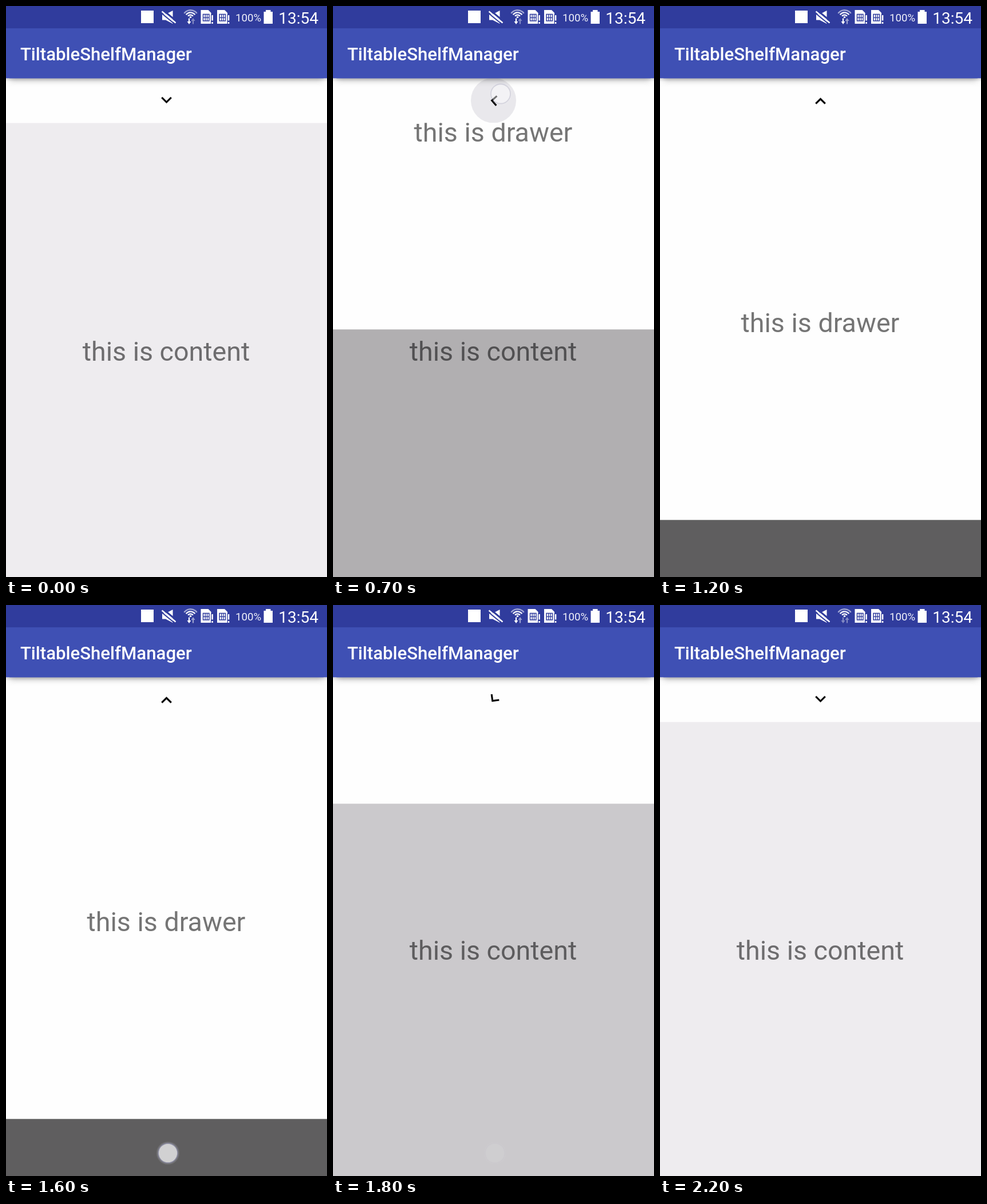
An HTML page with a canvas that plays this animation: 561x998 px, repeating every 2300 ms.

```html
<!DOCTYPE html>
<html lang="en">
<head>
<meta charset="utf-8">
<title>Drawer</title>
<style>
  html, body { margin: 0; width: 100%; height: 100%; overflow: hidden; }
  canvas { display: block; }
</style>
</head>
<body>
<canvas id="stage" width="561" height="998"></canvas>
<script>
const W = 561, H = 998, MID = 280.5;
const LOOP = 2300, STEP = 100;
const BAR = 39, TOP = 126.3, CLOSED = 204.3, TRAVEL = 693.9;
const DP = 1.558;
const STATUS_BLUE = '#303c9d';
const ctx = document.getElementById('stage').getContext('2d');

const clamp = v => Math.min(1, Math.max(0, v));
const settle = u => 1 - Math.pow(1 - clamp(u), 5);

// How far the drawer is open, 0 to 1
function openness(t) {
  return t < 1600 ? settle((t - 623.5) / 559) : 1 - settle((t - 1637) / 602);
}

function box(x, y, w, h, color) {
  ctx.fillStyle = color;
  ctx.fillRect(x, y, w, h);
}

function disc(x, y, r, color) {
  ctx.fillStyle = color;
  ctx.beginPath();
  ctx.arc(x, y, r, 0, Math.PI * 2);
  ctx.fill();
}

function poly(points, color) {
  ctx.fillStyle = color;
  ctx.beginPath();
  points.forEach(([x, y]) => ctx.lineTo(x, y));
  ctx.closePath();
  ctx.fill();
}

function line(x1, y1, x2, y2, width, color) {
  ctx.strokeStyle = color;
  ctx.lineWidth = width;
  ctx.beginPath();
  ctx.moveTo(x1, y1);
  ctx.lineTo(x2, y2);
  ctx.stroke();
}

function text(str, x, y, size, color, weight = 400, align = 'left') {
  ctx.font = `${weight} ${size}px Roboto, sans-serif`;
  ctx.textAlign = align;
  ctx.fillStyle = color;
  ctx.fillText(str, x, y);
}

function label(str, y) {
  text(str, 280, y, 46.6, 'rgba(0,0,0,.54)', 400, 'center');
}

function chevron(open) {
  ctx.save();
  ctx.translate(MID, 165.3);
  ctx.rotate(Math.PI * open);
  ctx.translate(0, -0.7);
  ctx.scale(DP, DP);
  poly([[4.59, -3.7], [0, .88], [-4.59, -3.7], [-6, -2.3], [0, 3.7], [6, -2.3]], '#000');
  ctx.restore();
}

function ripple(t) {
  const age = t - 600;
  if (age < 0 || age >= 500) return;
  const r = 43 - 13 * Math.exp(-age / 75);
  const alpha = age < 100 ? .085 : .085 * (1 - (age - 100) / 280);
  if (alpha <= 0) return;
  ctx.save();
  ctx.beginPath();
  ctx.rect(0, TOP, W, CLOSED - TOP);
  ctx.clip();
  disc(MID, 165, r, `rgba(20,10,50,${alpha})`);
  ctx.restore();
}

function touch(x, y, age) {
  if (age < 0 || age >= 225) return;
  const a = age < 25 ? 1 : clamp(1 - (age - 20) / 200);
  disc(x, y, 20, `rgba(235,235,255,${.12 * a})`);
  disc(x, y, 16.5, `rgba(255,255,255,${.68 * a})`);
  ctx.strokeStyle = `rgba(145,145,172,${.7 * a * a})`;
  ctx.lineWidth = 1.8;
  ctx.beginPath();
  ctx.arc(x, y, 17, 0, Math.PI * 2);
  ctx.stroke();
}

function mutedSpeaker() {
  poly([[273, 14.5], [279, 14.5], [291.5, 8], [291.5, 31], [279, 24.5], [273, 24.5]], '#fff');
  line(273, 6, 299, 27.5, 3, STATUS_BLUE);
  line(271, 12, 296, 32.5, 2, STATUS_BLUE);
  line(272.5, 9.5, 296.5, 29.5, 2.3, '#fff');
}

function arrow(x, tip, tail, alpha) {
  const color = `rgba(255,255,255,${alpha})`, d = Math.sign(tail - tip);
  poly([[x, tip], [x - 3.5, tip + 5 * d], [x + 3.5, tip + 5 * d]], color);
  box(x - 1.1, Math.min(tip + 5 * d, tail), 2.2, Math.abs(tail - tip) - 5, color);
}

function wifi(t) {
  [[13.8, .55], [9.6, .95], [5.4, 1]].forEach(([r, a]) => {
    ctx.strokeStyle = `rgba(255,255,255,${a})`;
    ctx.lineWidth = 2.4;
    ctx.beginPath();
    ctx.arc(322.5, 21, r, -Math.PI * .8, -Math.PI * .2);
    ctx.stroke();
  });
  disc(322.5, 19.5, 1.8, '#fff');
  const idle = t >= 2100;
  arrow(320, 32, 21.5, idle ? .4 : 1);
  arrow(327, 21, 31.5, t >= 1200 && !idle ? .52 : .4);
}

function simCard(x) {
  poly([[x, 7], [x + 13, 7], [x + 18, 12], [x + 18, 31], [x, 31]], '#fff');
  ctx.strokeStyle = STATUS_BLUE;
  ctx.lineWidth = 1.5;
  ctx.strokeRect(x + 4, 14.5, 10.5, 11.5);
  line(x + 7.7, 14.5, x + 7.7, 26, 1.3, STATUS_BLUE);
  line(x + 11, 14.5, x + 11, 26, 1.3, STATUS_BLUE);
  line(x + 4, 20.3, x + 14.5, 20.3, 1.3, STATUS_BLUE);
  box(x + 17.5, 15, 4.5, 16, STATUS_BLUE);
  box(x + 18.8, 16, 2.5, 9.5, '#fff');
  box(x + 18.8, 28, 2.5, 3, '#fff');
}

function statusBar(t) {
  box(0, 0, W, BAR, STATUS_BLUE);
  box(236, 8, 22, 22, '#fff');
  mutedSpeaker();
  wifi(t);
  simCard(340.5);
  simCard(369);
  text('100%', 401, 27, 12 * DP, '#f0f1fa');
  box(454, 7, 8.5, 4, '#fff');
  box(450.5, 10, 15.5, 21, '#fff');
  text('13:54', 546, 30.5, 18 * DP, '#fff', 400, 'right');
}

function toolbar() {
  const rim = ctx.createLinearGradient(0, TOP, 0, TOP + 6);
  rim.addColorStop(0, 'rgba(0,0,0,.1)');
  rim.addColorStop(1, 'rgba(0,0,0,0)');
  box(0, TOP, W, 6, rim);
  ctx.save();
  ctx.shadowColor = 'rgba(0,0,0,.34)';
  ctx.shadowBlur = 11;
  ctx.shadowOffsetY = 3;
  box(6, BAR, W - 12, TOP - BAR, '#3f50b4');
  ctx.restore();
  box(0, BAR, W, TOP - BAR, '#3f50b4');
  text('TiltableShelfManager', 24.9, 95, 20 * DP, '#fff', 500);
}

function draw(t) {
  const open = openness(t);
  const edge = CLOSED + Math.round(TRAVEL * open);

  box(0, BAR, W, H - BAR, '#eeecef');
  label('this is content', 620);
  // the scrim trails the drawer by one display refresh
  box(0, BAR, W, H - BAR, `rgba(0,0,0,${.6 * openness(t - 17)})`);

  box(0, BAR, W, edge - BAR, '#fefefe');
  label('this is drawer', edge - CLOSED - 124);
  box(0, BAR, W, CLOSED - BAR, '#fefefe');
  ripple(t);
  chevron(open);

  toolbar();
  statusBar(t);
  touch(293, 153.5, t - 600);
  touch(283, 958, t - 1600);
}

const start = performance.now();

function frame() {
  const t = (performance.now() - start) % LOOP;
  draw(Math.floor(t / STEP) * STEP);
  requestAnimationFrame(frame);
}
frame();
</script>
</body>
</html>
```
